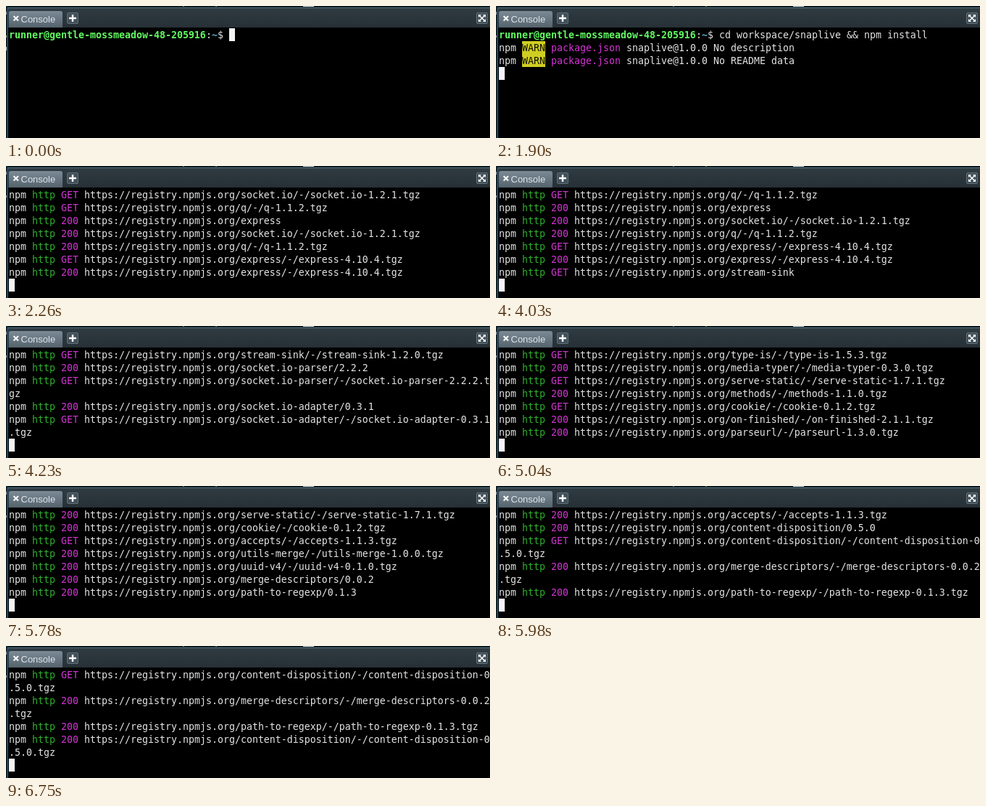
Recreate the animation shown at these times as an HTML page. Size 668 by 184 pixels, loop 8 s.

```html
<!DOCTYPE html>
<html lang="en">
<head>
<meta charset="utf-8">
<title>Console</title>
<style>
html, body { margin: 0; width: 100%; height: 100%; overflow: hidden; background: #000; }
svg { display: block; }
text { white-space: pre; }
#rows { font: 13.29px "DejaVu Sans Mono", monospace; }
</style>
</head>
<body>
<svg width="668" height="184" viewBox="0 0 668 184">
  <defs>
    <linearGradient id="bar" x2="0" y2="1">
      <stop stop-color="#303b42"/><stop offset="1" stop-color="#263036"/>
    </linearGradient>
    <linearGradient id="tab" x2="0" y2="1">
      <stop stop-color="#7b8a95"/><stop offset="1" stop-color="#55636d"/>
    </linearGradient>
    <g id="button">
      <rect x=".5" y=".5" width="15" height="15" rx="1.5" fill="#414f58" stroke="#5f6e78"/>
    </g>
  </defs>
  <rect width="668" height="184"/>
  <g shape-rendering="crispEdges">
    <rect width="668" height="2" fill="#0b161c"/>
    <path d="M244 0h2v1h-2zM289 0h2v1h-2z" fill="#8a8440"/>
    <rect x="410" width="15" height="1" fill="#eee"/>
    <rect x="2" y="2" width="666" height="28" fill="url(#bar)"/>
    <rect x="2" y="2" width="666" height="1" fill="#55798c"/>
    <rect width="1" height="184" fill="#08161d"/>
    <rect x="1" width="1" height="184" fill="#123448"/>
    <rect x="2" y="2" width="1" height="182" fill="#215f82"/>
    <path d="M0 8h1v4h-1zM0 41h1v3h-1z" fill="#8d9aa2"/>
    <path id="speck" d="M0 57h1v5h-1z" fill="#b8c4ca"/>
  </g>
  <path d="M4 30V10q0-3 3-3H75q3 0 3 3V30z" fill="url(#tab)"/>
  <path d="M10.5 14l6.5 6.5m0-6.5l-6.5 6.5" stroke="#f4f4f4" stroke-width="2.2"/>
  <text x="20.5" y="22.5" fill="#dde5ea" font-size="13" font-family="Liberation Sans, sans-serif">Console</text>
  <use href="#button" x="84" y="9"/>
  <path d="M87 17h10m-5-5v10" stroke="#fff" stroke-width="2.4"/>
  <use href="#button" x="649" y="9"/>
  <path d="M652 12h4l-4 4zM662 12v4l-4-4zM652 22v-4l4 4zM662 22h-4l4-4z" fill="#fff"/>
  <path d="M653 13l8 8m0-8l-8 8" stroke="#fff" stroke-width="1.5"/>
  <g id="rows"></g>
</svg>
<script>
const LOOP = 8000, COLUMNS = 83, ROWS = 8;
const LEFT = 4, TOP = 31, CELL = 8, PITCH = 18, BASELINE = 14;
const WHITE = '#e4e4e4', GREEN = '#2fb02f', MAGENTA = '#d433d4';

// A line is a list of [text, color, options].
const prompt = [
  ['runner@gentle-mossmeadow-48-205916', '#62fb62', { bold: true }],
  [':', WHITE], ['~', '#5fa8c8', { bold: true }], ['$ ', WHITE]
];
const command = [...prompt, ['cd workspace/snaplive && npm install', WHITE]];
const warn = what => [
  ['npm ', WHITE], ['WARN', '#101000', { back: '#cfcf22' }], [' ', WHITE],
  ['package.json', MAGENTA], [' snaplive@1.0.0 No ' + what, WHITE]
];

// "name@version" stands for the package archive.
function request(entry) {
  const [verb, target] = entry.split(' ');
  const path = target.replace(/^(.+)@(.+)$/, '$1/-/$1-$2.tgz');
  return [['npm ', WHITE], ['http', GREEN], [' ', WHITE], [verb, MAGENTA],
    [' https://registry.npmjs.org/' + path, WHITE]];
}

const burst = (start, steps) =>
  steps.map((step, i) => [start + 40 * i, step.split(', ').map(request)]);

const log = [
  [1900, [warn('description'), warn('README data')]],
  ...burst(1940, [
    'GET express, GET socket.io, GET q',
    '200 socket.io',
    '200 q',
    'GET socket.io@1.2.1, GET q@1.1.2',
    '200 express',
    '200 socket.io@1.2.1',
    '200 q@1.1.2, GET express@4.10.4'
  ]),
  ...burst(2260, ['200 express@4.10.4']),
  ...burst(4030, [
    'GET stream-sink',
    'GET socket.io-parser/2.2.2, GET socket.io-adapter/0.3.1',
    '200 stream-sink',
    'GET stream-sink@1.2.0, 200 socket.io-parser/2.2.2',
    'GET socket.io-parser@2.2.2',
    '200 socket.io-adapter/0.3.1, GET socket.io-adapter@0.3.1'
  ]),
  ...burst(4800, [
    '200 stream-sink@1.2.0, 200 socket.io-parser@2.2.2',
    '200 socket.io-adapter@0.3.1, GET type-is, GET media-typer',
    'GET methods/1.1.0, GET on-finished, GET parseurl',
    '200 media-typer, GET media-typer@0.3.0, 200 methods/1.1.0',
    'GET methods@1.1.0, GET on-finished@2.1.1, GET parseurl@1.3.0',
    'GET type-is@1.5.3, 200 media-typer@0.3.0, GET serve-static@1.7.1',
    '200 methods@1.1.0, GET cookie@0.1.2, 200 on-finished@2.1.1, 200 parseurl@1.3.0',
    '200 type-is@1.5.3, GET utils-merge@1.0.0, GET uuid-v4@0.1.0',
    '200 serve-static@1.7.1, 200 cookie@0.1.2, GET accepts@1.1.3',
    '200 utils-merge@1.0.0, 200 uuid-v4@0.1.0'
  ]),
  ...burst(5780, [
    '200 merge-descriptors/0.0.2, 200 path-to-regexp/0.1.3',
    'GET merge-descriptors@0.0.2, GET path-to-regexp@0.1.3',
    '200 accepts@1.1.3, 200 content-disposition/0.5.0',
    'GET content-disposition@0.5.0'
  ]),
  ...burst(5980, ['200 merge-descriptors@0.0.2, 200 path-to-regexp@0.1.3']),
  ...burst(6750, ['200 content-disposition@0.5.0'])
];

const width = line => line.reduce((sum, [text]) => sum + text.length, 0);

function wrap(line) {
  const rows = [[]];
  let column = 0;
  for (let [text, ...style] of line) {
    while (text) {
      if (column === COLUMNS) { rows.push([]); column = 0; }
      const part = text.slice(0, COLUMNS - column);
      rows[rows.length - 1].push([part, ...style]);
      column += part.length;
      text = text.slice(part.length);
    }
  }
  return rows;
}

function linesAt(t) {
  if (t < 650) return [prompt];
  if (t < 1030) return [command];
  return [command, ...log.filter(([at]) => at <= t).flatMap(([, lines]) => lines), []];
}

const box = (x, y, w, fill) =>
  `<rect x="${x}" y="${y}" width="${w}" height="${PITCH}" fill="${fill}"/>`;

function drawRow(row, index) {
  const y = TOP + PITCH * index;
  let x = LEFT, svg = '';
  for (const [text, color, { bold, back } = {}] of row) {
    const w = text.length * CELL;
    if (back) svg += box(x, y, w, back);
    svg += `<text x="${x}" y="${y + BASELINE}" fill="${color}"${bold ? ' font-weight="bold"' : ''}>` +
      text.replace(/&/g, '&amp;') + '</text>';
    x += w;
  }
  return svg;
}

const rowsNode = document.getElementById('rows');
const speck = document.getElementById('speck');
let shown = '';

function render(t) {
  const rows = linesAt(t).flatMap(wrap).slice(-ROWS);
  const last = rows.length - 1;
  const cursor = box(LEFT + CELL * width(rows[last]), TOP + PITCH * last, CELL, '#f4f4f4');
  const svg = rows.map(drawRow).join('') + cursor;
  if (svg !== shown) rowsNode.innerHTML = shown = svg;
  speck.setAttribute('visibility', t < 40 ? 'visible' : 'hidden');
}

const start = performance.now();
function tick() {
  render((performance.now() - start) % LOOP);
  requestAnimationFrame(tick);
}
tick();
</script>
</body>
</html>
```
